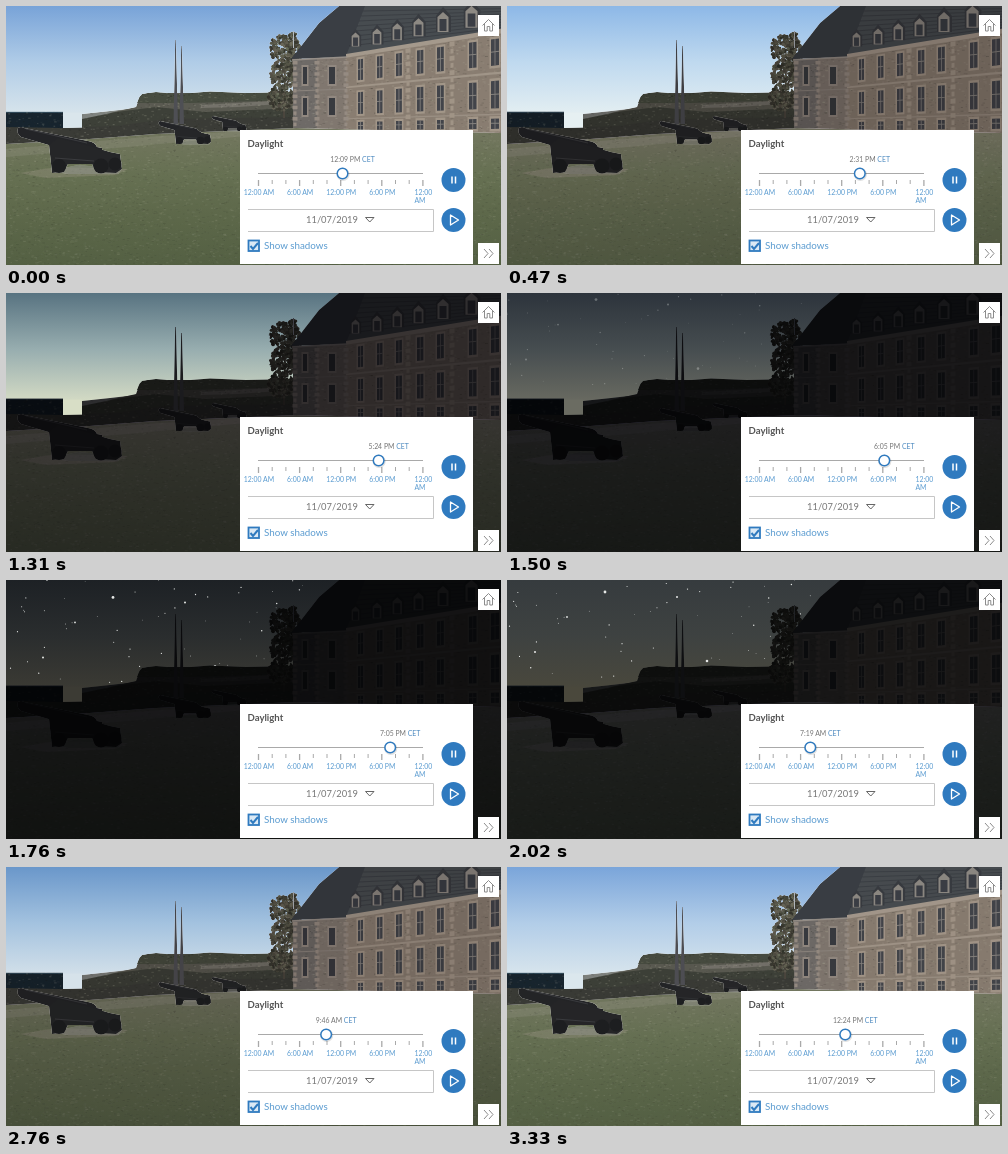
Recreate the animation shown at these times as an HTML page with a canvas. Size 495 by 259 pixels, loop 3400 ms.

```html
<!DOCTYPE html>
<html lang="en">
<head>
<meta charset="utf-8">
<title>Daylight</title>
<style>
  html, body { margin: 0; width: 100%; height: 100%; overflow: hidden; background: #222; }
  canvas, svg { position: absolute; left: 0; top: 0; width: 495px; height: 259px; }
  text { font-family: Lato, "Open Sans", sans-serif; }
  .small { font-size: 6.9px; text-anchor: middle; fill: #5a9bd0; }
  .clock { fill: #747474; }
  .line { fill: none; stroke: #a9a9a9; }
  .icon { fill: none; stroke: #8c8c8c; stroke-width: 1; }
  .blue { fill: #2f7abf; }
</style>
</head>
<body>
<canvas id="scene" width="495" height="259"></canvas>
<svg viewBox="0 0 495 259">
  <rect x="234" y="124" width="233" height="134" fill="#fff"/>
  <text x="241.5" y="141" font-size="9.6" font-weight="700" fill="#555">Daylight</text>
  <path class="line" d="M252 167.5H417"/>
  <g id="ticks"></g>
  <g id="thumb">
    <text class="small clock" x="10" y="156"><tspan id="clock"></tspan> <tspan fill="#4d8ac0">CET</tspan></text>
    <circle cx=".5" cy="168.3" r="6.6" fill="#000" opacity=".12"/>
    <circle cy="167.5" r="5.3" fill="#fff" stroke="#2f7abf" stroke-width="1.5"/>
  </g>
  <circle class="blue" cx="447.5" cy="174" r="12"/>
  <path d="M446 170.500v7M449.500 170.500v7" stroke="#fff" stroke-width="1.5"/>
  <circle class="blue" cx="447.5" cy="214" r="12"/>
  <path d="M444.500 209v10l8-5z" fill="none" stroke="#fff" stroke-width="1.3" stroke-linejoin="round"/>
  <path d="M242 203.500H427.500V225.500H242" fill="none" stroke="#c6c6c6"/>
  <text x="326" y="217.300" font-size="9.4" text-anchor="middle" fill="#777">11/07/2019</text>
  <path d="M359.500 211.500h8.500l-4.250 4.500z" fill="none" stroke="#666"/>
  <rect x="242.500" y="234.500" width="10.500" height="10.500" fill="#dbe9f5" stroke="#2f7abf" stroke-width="1.8"/>
  <path d="M244.500 240l2.500 3 5-6" fill="none" stroke="#2f7abf" stroke-width="2"/>
  <text x="258" y="243.200" font-size="9.8" fill="#5a9bd0">Show shadows</text>
  <path d="M472 9h21v21h-21zM472 237h21v21h-21z" fill="#fff"/>
  <path class="icon" d="M476.500 19.500l6-6 6 6M478.500 18v7h2.700v-4.500h2.600V25h2.700v-7"/>
  <path class="icon" d="M478 243l4 4.500-4 4.500M483 243l4 4.500-4 4.500"/>
</svg>
<script>
const W = 495, H = 259, LOOP = 3400;
const $ = id => document.getElementById(id);
const ctx = $('scene').getContext('2d');

let seed = 71;
const rand = (a = 0, b = 1) => {
  seed = (seed * 16807) % 2147483647;
  return a + (b - a) * seed / 2147483647;
};
const newLayer = () => Object.assign(document.createElement('canvas'), { width: W, height: H }).getContext('2d');
const fill = (c, color, d) => { c.fillStyle = color; c.fill(new Path2D(d)); };
const stroke = (c, color, width, d) => {
  c.strokeStyle = color; c.lineWidth = width; c.stroke(new Path2D(d));
};
const vertical = (c, y0, y1, ...colors) => {
  const g = c.createLinearGradient(0, y0, 0, y1);
  colors.forEach((color, i) => g.addColorStop(i / (colors.length - 1), color));
  return g;
};
const speckle = (c, n, x0, y0, x1, y1, w, alpha) => {
  c.save();
  c.globalCompositeOperation = 'source-atop';
  for (let i = 0; i < n; i++) {
    const tone = rand() < .55 ? '15,18,10' : '200,200,175';
    c.fillStyle = `rgba(${tone},${rand(0, alpha)})`;
    c.fillRect(rand(x0, x1), rand(y0, y1), rand(1, w), 1);
  }
  c.restore();
};

// Buildings, fort and trees
function paintBack() {
  const c = newLayer();
  fill(c, '#17242e', 'M0 106H57V123H0Z');
  fill(c, '#496d82', 'M0 105.500H57V106.500H0Z');
  fill(c, '#7f837f', 'M76 108L104 105 130 102V122H76Z');
  fill(c, '#5a5a51', 'M100 121L104 107 130 101 134 90 142 87 205 87 287 88V127H100Z');
  fill(c, '#474c40', 'M133 92L136 88 150 86 172 88 204 85.500 240 87 287 86V94L186 97 131 97Z');
  fill(c, '#3d4038', 'M76 113L110 106 150 101 200 106 290 102V126H76Z');
  fill(c, '#74726a', 'M195 99L230 97 286 94V97L232 101 195 102Z');
  fill(c, '#3a3b36', 'M0 121L56 122 110 120 160 113 290 111V130L90 135 0 140Z');
  speckle(c, 1300, 0, 86, 290, 137, 2.5, .25);
  fill(c, '#4e4f54', 'M169.200 34H169.900L172 118H167.500ZM175.200 40H175.900L178 118H173.500Z');

  stroke(c, '#4b463e', 2, 'M278 112L279 60M279 76L270 55M279 82L288 62');
  for (const [x, y, rx, ry] of [[276, 42, 13, 13], [277, 69, 13, 15], [275, 92, 13, 13], [287, 50, 8, 24]])
    for (let i = 0; i < 230; i++) {
      const a = rand(0, 6.28), r = Math.sqrt(rand());
      c.fillStyle = `hsl(${rand(40, 75)},9%,${rand(18, 40)}%)`;
      c.beginPath();
      c.arc(x + rx * r * Math.cos(a), y + ry * r * Math.sin(a), rand(.8, 1.9), 0, 7);
      c.fill();
    }
  paintBuilding(c);
  stroke(c, '#b4bac0', 1, 'M287.500 25V42');
  return c.canvas;
}

function paintBuilding(c) {
  const base = 128, eave = x => 50 - (x - 338) * .16;
  const level = (x, f) => eave(x) + f * (base - eave(x));
  const quad = (x, w, f0, f1, color) => fill(c, color,
    `M${x} ${level(x, f0)}L${x + w} ${level(x + w, f0)}V${level(x + w, f1)}L${x} ${level(x, f1)}Z`);
  const openings = (x, w, f0, f1) => {
    quad(x - 1.5, w + 3, f0 - .025, f1 + .025, '#a29688');
    quad(x, w, f0, f1, '#42444a');
    quad(x + w / 2 - .4, .8, f0, f1, '#85827e');
    quad(x, w, (f0 + f1) / 2 - .01, (f0 + f1) / 2, '#85827e');
  };
  fill(c, '#6e6a67', 'M287 53L311 52V128H287Z');
  fill(c, '#80776f', 'M311 52L341 50V128H311Z');
  quad(340, 155, 0, 1, '#897d71');
  speckle(c, 1500, 287, 28, 495, 128, 3, .2);
  fill(c, '#3a3e44', 'M285 53L313 17 333 0H360L341 51Z');
  fill(c, '#474c50', 'M340 50L359 0H495V25Z');
  for (let i = 1; i < 9; i++) stroke(c, 'rgba(25,26,32,.25)', 1, `M${359 - i * 2} ${i * 5}L495 ${i * 2.7}`);

  quad(340, 155, -.02, .025, '#a4998c');
  quad(340, 155, .395, .415, '#a09588');
  quad(340, 155, .8, .815, '#9a8f83');
  stroke(c, '#968f88', 1.5, 'M286 54L341 51');
  stroke(c, '#8b847d', 1.2, 'M287 85L341 83');
  for (let i = 0; i < 13; i++) {
    const w = i % 2 ? 3 : 5;
    c.fillStyle = '#958b82';
    for (const x of [289, 311, 340]) c.fillRect(x - w / 2, 55 + i * 5.6, w, 3.5);
    for (const x of [402, 446]) quad(x - w / 2, w, .03 + i * .075, .08 + i * .075, '#a09486');
  }
  for (const x of [352, 371, 390, 411, 431, 463, 485]) {
    const w = 5 + (x - 350) / 45;
    openings(x, w, .07, .33);
    openings(x, w, .48, .75);
    openings(x, w, .85, .95);
  }
  for (const [x, w] of [[297, 4], [323, 6]]) for (const y of [61, 92]) {
    c.fillStyle = '#918880'; c.fillRect(x - 1.5, y - 2, w + 3, 21);
    c.fillStyle = '#383a3f'; c.fillRect(x, y, w, 17);
  }
  for (const [x, y, s] of [[346, 28, .7], [367, 24, .8], [387, 19, .85], [408, 14, .9], [432, 8, 1], [460, 2, 1.1]]) {
    c.save();
    c.translate(x, y); c.scale(s, s);
    fill(c, '#383b40', 'M-2 2L5 -7 13 2V18H-2Z');
    fill(c, '#8d8983', 'M-.5 3L5 -2 10.500 3V18H-.5Z');
    fill(c, '#3b3e45', 'M1.500 5H8.500V17H1.500Z');
    c.restore();
  }
}

// Lawn
function paintGround() {
  const c = newLayer();
  fill(c, vertical(c, 124, H, '#73775f', '#667052', '#5c6749', '#546043'),
    'M0 138L70 134 150 128 290 122 495 127V259H0Z');
  fill(c, 'rgba(145,143,126,.35)', 'M0 143L140 131 240 125V130L110 142 0 151Z');
  fill(c, 'rgba(150,146,129,.4)', 'M14 167L50 161 122 163 110 169 40 172Z');
  speckle(c, 6500, 0, 126, W, H, 3, .13);
  return c.canvas;
}

function paintCannons() {
  const c = newLayer();
  const cannon = (x, y, s) => {
    c.save();
    c.translate(x, y); c.scale(s, s);
    fill(c, 'rgba(20,24,16,.45)', 'M32 44L60 38 104 42 100 47 50 47Z');
    fill(c, '#232427', 'M0 1Q3 -1 6 1L70 14Q77 15 79 20L84 21V25L78 26Q74 29 68 27L34 19 3 10Q-2 6 0 1Z');
    fill(c, '#252628', 'M31 18L40 11 75 20 92 25 102 27 104 42 98 46 78 45 74 37 50 37 46 45 34 46Z');
    c.fillStyle = '#1d1e20';
    for (const [wx, wy, r] of [[41, 39, 7], [83, 39, 7.5], [97, 37, 6.5]]) {
      c.beginPath(); c.arc(wx, wy, r, 0, 7); c.fill();
    }
    stroke(c, '#3b3c3f', 1, 'M8 2L69 16M37 31L76 34');
    c.restore();
  };
  cannon(206, 110, .33);
  cannon(153, 115, .5);
  cannon(12, 121, 1);
  return c.canvas;
}

const back = paintBack(), ground = paintGround(), cannons = paintCannons(), buffer = newLayer();
const stars = [[98, 12, 1.4], [200, 81, 1.3], [28, 72, 1], [170, 17, 1], [60, 37, .9]];
for (let i = 0; i < 80; i++) stars.push([rand(-20, 340), rand(-20, 105), rand(.3, .75)]);

// Minute of day, sky top / middle / horizon, light on walls, light on lawn
const moods = [
  [391, '#22272a #2c2f30 #3b3a33 #232427 #3a3848'],
  [439, '#363b3e #3e4241 #4a483c #2d2e31 #484658'],
  [480, '#5a7187 #8c9a9f #c2c0ab #6a686c #857e92'],
  [530, '#5f87b3 #98b6d2 #d0dce3 #aaa6a8 #b8b2c2'],
  [586, '#6a97ca #a3c2df #d6e2ea #dcd8d8 #d8d2da'],
  [729, '#78a3d8 #b0cce7 #dae6ec #ffffff #ffffff'],
  [860, '#8ab6e6 #bed8ee #e5eff2 #d2cecd #f0e8f2'],
  [973, '#a5cef5 #cbe5f7 #f0f6f3 #8e8b8d #c6b6d8'],
  [1044, '#587381 #97adaf #d8dec6 #57555b #787082'],
  [1085, '#2d343c #464d50 #6b6c62 #292a30 #434052'],
  [1145, '#1d2125 #2a2d2e #3c3b34 #1e1f23 #32303e']
].map(([m, s]) => [m, s.split(' ').map(h => [1, 3, 5].map(i => parseInt(h.slice(i, i + 2), 16)))]);

const segment = (knots, v) => {
  let i = 0;
  while (i < knots.length - 2 && v >= knots[i + 1][0]) i++;
  const [a, b] = [knots[i], knots[i + 1]];
  return [a[1], b[1], Math.max(0, Math.min(1, (v - a[0]) / (b[0] - a[0])))];
};
const lerp = (a, b, t) => a + (b - a) * t;
const ramp = (knots, v) => lerp(...segment(knots, v));
const mood = minute => {
  const [a, b, t] = segment(moods, minute);
  return a.map((col, i) => `rgb(${col.map((v, j) => lerp(v, b[i][j], t))})`);
};

function drawLit(layer, light) {
  buffer.globalCompositeOperation = 'copy';
  buffer.drawImage(layer, 0, 0);
  buffer.globalCompositeOperation = 'multiply';
  buffer.fillStyle = light;
  buffer.fillRect(0, 0, W, H);
  buffer.globalCompositeOperation = 'destination-in';
  buffer.drawImage(layer, 0, 0);
  ctx.drawImage(buffer.canvas, 0, 0);
}

function glow(x, y, r, sy, color, ...stops) {
  ctx.save();
  ctx.translate(x, y); ctx.scale(1, sy);
  const g = ctx.createRadialGradient(0, 0, 0, 0, 0, r);
  stops.forEach(([at, alpha]) => g.addColorStop(at, `rgba(${color},${alpha})`));
  ctx.fillStyle = g;
  ctx.fillRect(-r, -r, 2 * r, 2 * r);
  ctx.restore();
}

// Low sun mirrored in the lawn, with the long shadow of the near cannon
function drawShine(amount) {
  ctx.save();
  ctx.clip(new Path2D('M0 138L70 134 150 128 290 122V259H0Z'));
  glow(172, 180, 150, .72, '205,196,190', [0, .6 * amount], [.35, .48 * amount], [.7, .16 * amount], [1, 0]);
  fill(ctx, `rgba(50,50,45,${.5 * amount})`, 'M0 172L45 164 118 165 112 180 88 187 66 199 30 203 0 215Z');
  ctx.restore();
}

function drawScene(minute) {
  const [top, mid, low, walls, lawn] = mood(minute);
  ctx.fillStyle = vertical(ctx, 0, 112, top, mid, low);
  ctx.fillRect(0, 0, W, H);

  const starlight = ramp([[439, .95], [475, 0], [1050, 0], [1085, .3], [1125, .95]], minute);
  if (starlight > 0) {
    const drift = (minute < 720 ? minute - 439 : minute - 1115) * .3;
    ctx.fillStyle = `rgba(240,242,240,${starlight})`;
    for (const [x, y, r] of stars) {
      ctx.beginPath(); ctx.arc(x + drift, y + drift * .6, r, 0, 7); ctx.fill();
    }
  }
  const sunX = 126 + (minute - 973) * 1.45, sunY = 9 + (minute - 973) * 1.3;
  if (minute > 900 && minute < 1036)
    glow(sunX, sunY, 34, 1, '255,255,248', [0, 1], [.14, 1], [.19, .4], [.5, .12], [1, 0]);

  drawLit(back, walls);
  const shine = ramp([[880, 0], [973, 1], [1030, 0]], minute);
  ctx.fillStyle = low;
  ctx.fillRect(57, 106.5, 19, 15);
  ctx.globalAlpha = shine * .9;
  ctx.fillRect(0, 105, 57, 16);
  ctx.globalAlpha = 1;

  drawLit(ground, lawn);
  if (shine > 0) drawShine(shine);
  drawLit(cannons, walls);
}

// Playback advances in uneven steps, skipping the night
const steps = [0];
for (const [from, to, n] of [[70, 590, 9], [640, 760, 3], [960, 1430, 8], [1500, 2020, 9], [2090, 2560, 8], [2760, 3260, 9]])
  for (let i = 0; i < n; i++) steps.push(Math.round(from + (to - from) * i / (n - 1)));
steps.push(3330);
const minutes = [[0, 729], [12, 973], [18, 1044], [21, 1085], [25, 1145], [26, 391], [29, 439], [38, 586], [47, 744]];

function drawClock(minute) {
  const h = Math.floor(minute / 60), m = String(minute % 60).padStart(2, '0');
  $('clock').textContent = `${h % 12 || 12}:${m} ${h < 12 ? 'AM' : 'PM'}`;
  $('thumb').setAttribute('transform', `translate(${253 + minute / 1440 * 165})`);
}

let ticks = '';
for (let i = 0; i <= 12; i++) {
  const x = 252.5 + i * 13.7, major = i % 3 === 0;
  ticks += `<path class="line" d="M${x} 174v${major ? 6 : 4}" stroke-width="${major ? 1.3 : 1}"/>`;
}
['12:00 AM', '6:00 AM', '12:00 PM', '6:00 PM', '12:00'].forEach((label, i) => {
  ticks += `<text class="small" x="${253 + i * 41.1}" y="189">${label}</text>`;
});
$('ticks').innerHTML = ticks + '<text class="small" x="414" y="197">AM</text>';

let shown = -1;
function tick() {
  const now = performance.now() % LOOP;
  const step = steps.filter(t => t <= now).length - 1;
  if (step !== shown) {
    shown = step;
    const minute = Math.round(ramp(minutes, step));
    drawScene(minute);
    drawClock(minute);
  }
  requestAnimationFrame(tick);
}
tick();
</script>
</body>
</html>
```
